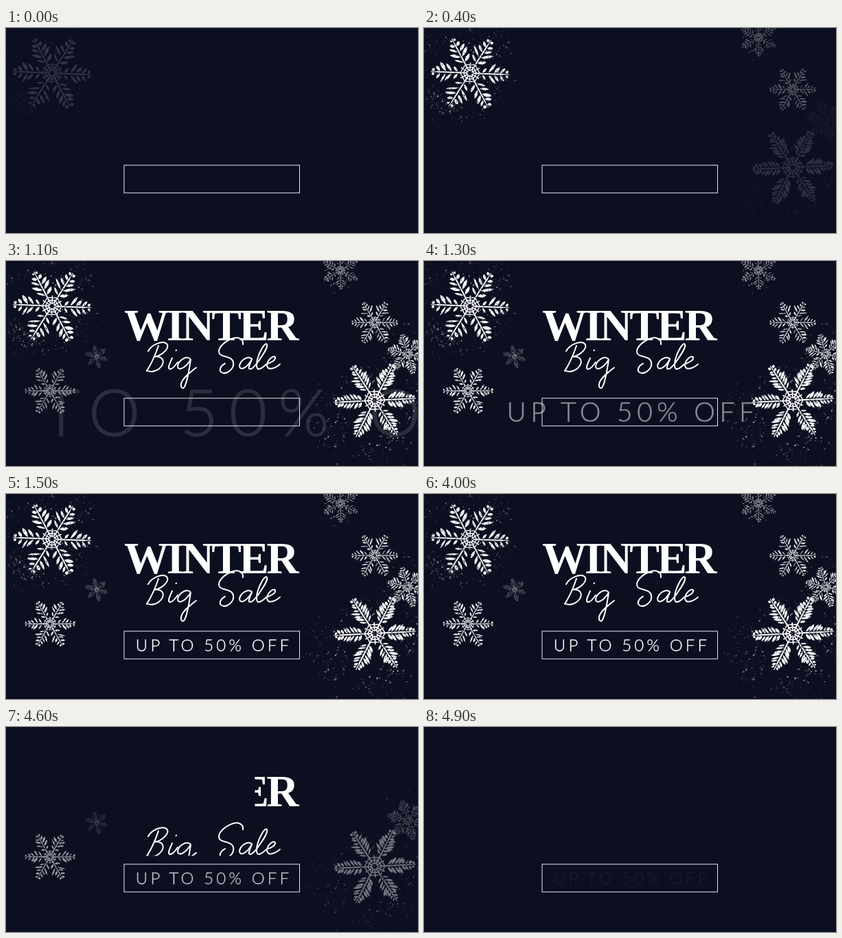
These frames come from a looping animation (600 by 300 pixels, 5 s). An HTML page with a canvas:

```html
<!DOCTYPE html>
<html lang="en">
<head>
<meta charset="utf-8">
<title>Winter Big Sale</title>
<style>
  html, body { margin: 0; width: 100%; height: 100%; overflow: hidden; background: #0c0f20; }
  canvas, svg { position: absolute; left: 0; top: 0; width: 600px; height: 300px; overflow: hidden; }
  #title { font: bold 65.5px "Liberation Serif", "Times New Roman", serif; letter-spacing: -3.7px; }
  #offer { font: 300 24px Lato, "Open Sans", sans-serif; letter-spacing: 4.1px; stroke: #fff; stroke-width: .35px; }
</style>
</head>
<body>
<canvas id="snow" width="600" height="300"></canvas>
<svg viewBox="0 0 600 300" fill="#fff">
  <clipPath id="wipe"><rect id="wipeRect" x="160" y="55" width="280" height="75"/></clipPath>
  <clipPath id="mask"><rect x="190" y="105" width="230" height="83.5"/></clipPath>
  <g clip-path="url(#wipe)"><text id="title" x="297.5" y="115.8" text-anchor="middle">WINTER</text></g>
  <g clip-path="url(#mask)">
    <g id="script" role="img" aria-label="Big Sale" fill="none" stroke="#fff" stroke-width="2" stroke-linecap="round" stroke-linejoin="round">
      <path d="M222 124C218 136 212 150 205 161M207 132C212 122 228 116 234 121C239 127 228 138 217 140C228 139 231 146 227 153C222 161 211 164 205 160"/>
      <path d="M242 142C239 149 235 156 238 158C241 159 246 154 250 148M247.5 131l.6-.6"/>
      <path d="M268 143C262 138 251 146 250 154C250 161 261 158 269 144C267 158 264 176 260 184C257 189 253 184 256 177C259 170 268 163 277 156"/>
      <path d="M345 122C346 113 337 110 328 114C316 119 307 129 311 136C315 141 329 139 331 148C333 158 321 167 314 163C309 160 313 153 319 150"/>
      <path d="M358 143C352 138 342 145 340 153C340 161 350 158 358 144C355 151 352 158 355 158C358 159 362 154 366 149C373 139 382 127 380 122C377 118 369 133 366 144C364 154 365 159 369 158C373 157 376 154 379 151C386 149 393 145 392 141C390 137 381 144 380 152C380 161 391 158 399 151"/>
    </g>
  </g>
  <text id="offer" x="302.5" y="229.5" text-anchor="middle">UP TO 50% OFF</text>
  <rect x="172" y="200.8" width="255.5" height="40.5" fill="none" stroke="#e6e7ef"/>
</svg>
<script>
const $ = id => document.getElementById(id);
const ctx = $('snow').getContext('2d');
const LOOP = 5000, STEP = 100;

let seed = 11;
const rnd = () => (seed = seed * 16807 % 2147483647) / 2147483647;
const clamp = v => Math.max(0, Math.min(1, v));
const ease = u => u < .5 ? 4 * u ** 3 : 1 - (2 - 2 * u) ** 3 / 2;

// Each flake: place, radius, turn, tone, barb pairs, barb width and length,
// dust [x, y, spread, clumps], start of fade in, start and length of fade out.
const flakes = [
  { x: 67, y: 66, r: 57, turn: .04, tone: 1, n: 5, w: .07, len: .36, dust: [50, 62, 88, 75], on: -80, off: 3980, fade: 320 },
  { x: 487, y: 14, r: 28, turn: .5, tone: .6, n: 5, w: .06, len: .36, dust: [482, 14, 36, 8], on: 100, off: 4000, fade: 350 },
  { x: 537, y: 90, r: 34, turn: 0, tone: .9, n: 5, w: .06, len: .38, on: 200, off: 4150, fade: 400 },
  { x: 585, y: 136, r: 30, turn: .25, tone: .95, n: 6, w: .07, len: .4, dust: [588, 125, 50, 18], on: 370, off: 4350, fade: 350 },
  { x: 537, y: 204, r: 60, turn: -.05, tone: 1, n: 8, w: .06, len: .3, dust: [530, 235, 92, 85], on: 330, off: 4370, fade: 400 },
  { x: 132, y: 140, r: 17, turn: .3, tone: .55, n: 5, w: .06, len: .36, on: 700, off: 4400, fade: 400 },
  { x: 64, y: 190, r: 37, turn: 0, tone: .95, n: 5, w: .065, len: .36, on: 800, off: 4480, fade: 370 }
];

function line(g, x1, x2, w) {
  g.lineWidth = w;
  g.beginPath();
  g.moveTo(x1, 0);
  g.lineTo(x2, 0);
  g.stroke();
}

function dot(g, x, y, r) {
  g.beginPath();
  g.arc(x, y, r, 0, 7);
  g.fill();
}

function leaf(g, d, side, len, w) {
  g.save();
  g.translate(d, 0);
  g.rotate(side * (.8 + rnd() * .25));
  g.beginPath();
  g.moveTo(.03, 0);
  g.quadraticCurveTo(len * .6, -w, len, 0);
  g.quadraticCurveTo(len * .6, w, .03, 0);
  g.fill();
  g.restore();
}

function arm(g, f) {
  line(g, .08, .85, .035);
  line(g, .85, 1, .02);
  for (let i = 0; i < f.n; i++) {
    const d = .3 + .6 * i / (f.n - 1);
    const size = f.len * Math.min(1.6 * d, 1.15 - d) * (1.1 + rnd() * .5);
    for (const side of [-1, 1]) leaf(g, d, side, size, f.w * (.7 + rnd() * .6));
  }
}

function hexagon(g, r) {
  g.beginPath();
  for (let i = 0; i < 6; i++) g.lineTo(r * Math.cos(i * Math.PI / 3), r * Math.sin(i * Math.PI / 3));
  g.closePath();
  g.stroke();
}

function scatter(g, [x, y, spread, clumps]) {
  for (let i = 0; i < clumps; i++) {
    const a = rnd() * 6.283, d = spread * (.4 + .6 * rnd());
    const near = 1.2 - d / spread;
    for (let j = 0; j < 11; j++) {
      const b = rnd() * 6.283, e = 16 * rnd();
      g.globalAlpha = near * (.15 + .85 * rnd() ** 2);
      dot(g, x + d * Math.cos(a) + e * Math.cos(b), y + d * Math.sin(a) + e * Math.sin(b), .3 + 1.1 * rnd() ** 3);
    }
  }
}

function paint(f) {
  const layer = document.createElement('canvas');
  layer.width = 600;
  layer.height = 300;
  const g = layer.getContext('2d');
  g.fillStyle = g.strokeStyle = '#fff';
  g.globalAlpha = f.tone;
  g.save();
  g.translate(f.x, f.y);
  g.rotate(f.turn);
  g.scale(f.r, f.r);
  for (let i = 0; i < 6; i++) {
    arm(g, f);
    g.rotate(Math.PI / 6);
    line(g, .05, .27, .03);
    g.rotate(Math.PI / 6);
  }
  g.lineWidth = .025;
  for (const r of [.09, .17, .25]) hexagon(g, r);
  g.restore();

  // Wear the crystal down with small holes.
  g.globalCompositeOperation = 'destination-out';
  for (let i = 0; i < f.r * 16; i++) {
    const a = rnd() * 6.283, d = f.r * Math.sqrt(rnd());
    g.globalAlpha = .3 + rnd() * .6;
    dot(g, f.x + d * Math.cos(a), f.y + d * Math.sin(a), .3 + rnd() * .6);
  }
  g.globalCompositeOperation = 'source-over';

  if (f.dust) scatter(g, f.dust);
  f.layer = layer;
}

function draw(now) {
  const t = Math.floor(now % LOOP / STEP) * STEP;
  const part = (start, length) => clamp((t - start) / length);

  ctx.clearRect(0, 0, 600, 300);
  for (const f of flakes) {
    ctx.globalAlpha = part(f.on, 500) * (1 - part(f.off, f.fade));
    ctx.drawImage(f.layer, 0, 0);
  }

  const left = 172 + 256 * ease(part(4300, 500));
  const right = 172 + 256 * ease(part(430, 500));
  $('wipeRect').setAttribute('x', left);
  $('wipeRect').setAttribute('width', Math.max(0, right - left));

  const sink = 80 * (1 - ease(part(400, 500)) + ease(part(4400, 450)));
  $('script').setAttribute('transform', `translate(0 ${sink})`);

  const u = part(1000, 500);
  const zoom = 4 - 3 * (u < .5 ? 8 * u ** 4 : 1 - 8 * (1 - u) ** 4);
  $('offer').setAttribute('transform', `translate(300 220.5) scale(${zoom}) translate(-300 -220.5)`);
  $('offer').setAttribute('opacity', u ** 1.3 * (1 - part(4500, 420)));
}

flakes.forEach(paint);
let begin;
function tick(now) {
  begin ??= now;
  draw(now - begin);
  requestAnimationFrame(tick);
}
draw(0);
requestAnimationFrame(tick);
</script>
</body>
</html>
```
